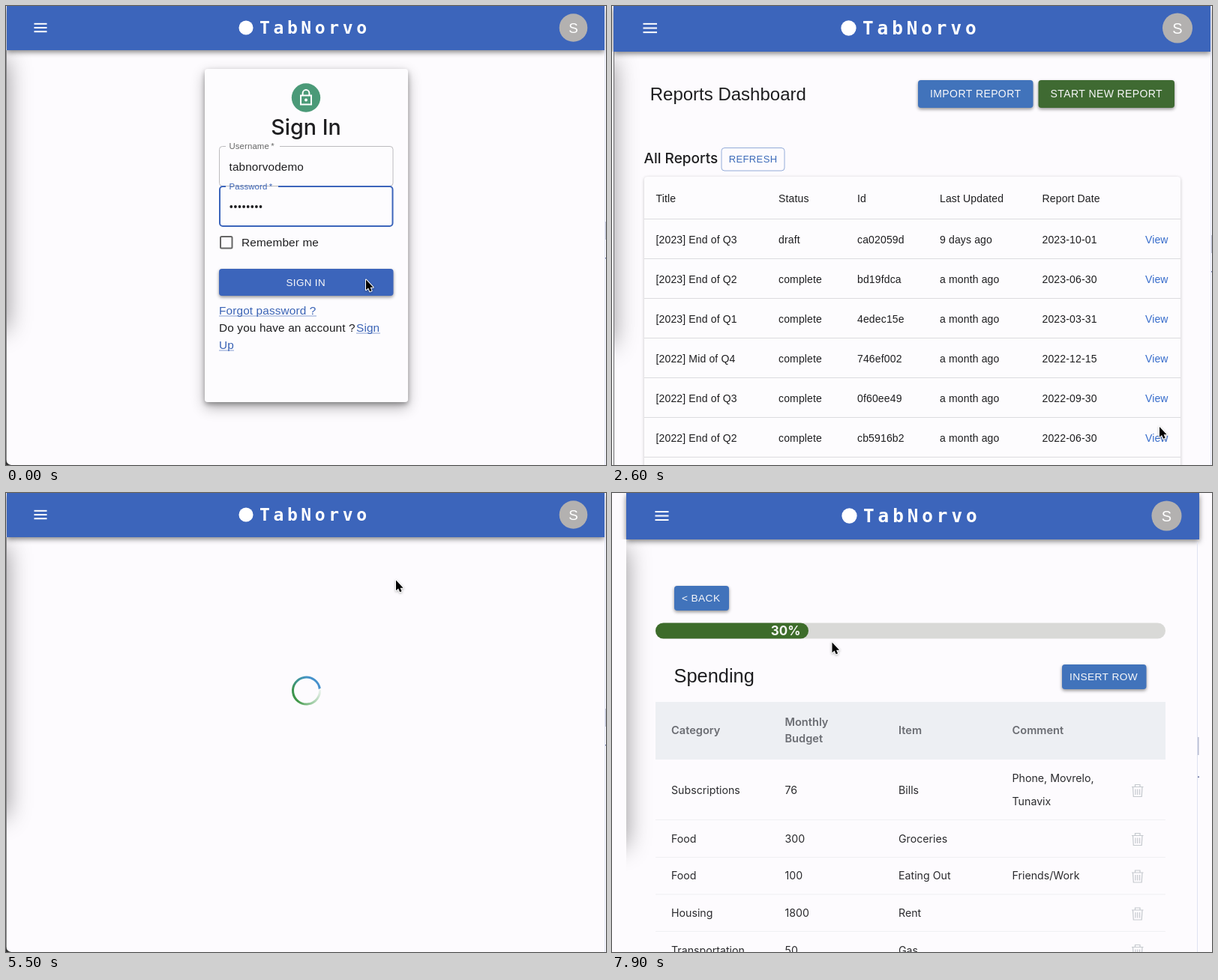
These frames come from a looping animation (800 by 613 pixels, 8000 ms). An HTML page with a canvas:

```html
<!DOCTYPE html>
<html lang="en">
<head>
<meta charset="utf-8">
<title>Budget reports</title>
<style>
html, body { margin: 0; width: 100%; height: 100%; overflow: hidden; background: #fdfbfe; }
canvas { display: block; width: 100vw; height: 100vh; }
</style>
</head>
<body>
<canvas id="stage" width="800" height="613"></canvas>
<script>
const ctx = document.getElementById('stage').getContext('2d');
const LOOP = 8000, STEP = 100, W = 800, H = 613;
const SANS = '"Liberation Sans", Arial, sans-serif';
const UI = 'Inter, sans-serif';
const MONO = '"DejaVu Sans Mono", monospace';
const BG = '#fdfbfe', INK = '#1e1e20', BAR = '#3c65bb', LINK = '#3a63b5';
const BLUE = '#4173bb', GREEN = '#3f6a32', ORANGE = '#c66a31', RED = '#a43a31';

// ---------- helpers ----------
function text(s, x, y, size, color = INK, o = {}) {
  ctx.font = `${o.weight || 400} ${size}px ${o.font || SANS}`;
  ctx.letterSpacing = (o.gap || 0) + 'px';
  ctx.textAlign = o.align || 'left';
  ctx.fillStyle = color;
  ctx.fillText(s, x, y);
}

function box(x, y, w, h, color) {
  ctx.fillStyle = color;
  ctx.fillRect(x, y, w, h);
}

function round(x, y, w, h, r) {
  ctx.beginPath();
  ctx.roundRect(x, y, w, h, r);
}

function disc(x, y, r, color) {
  ctx.beginPath();
  ctx.arc(x, y, r, 0, Math.PI * 2);
  ctx.fillStyle = color;
  ctx.fill();
}

function shadowed(alpha, blur, dy, draw) {
  ctx.save();
  ctx.shadowColor = `rgba(0,0,0,${alpha})`;
  ctx.shadowBlur = blur;
  ctx.shadowOffsetY = dy;
  draw();
  ctx.restore();
}

function card(x, y, w, h, alpha, blur, dy) {
  shadowed(alpha, blur, dy, () => {
    round(x, y, w, h, 4);
    ctx.fillStyle = '#fdfcfe';
    ctx.fill();
  });
}

function button(label, x, y, w, h, color, tx, size = 13) {
  shadowed(0.42, 4, 2, () => {
    round(x, y, w, h, 4);
    ctx.fillStyle = color;
    ctx.fill();
  });
  text(label, tx, y + h / 2 + size * 0.34, size, '#f8f8fa', { gap: size * 0.0286 });
}

function outlined(label, x, y, w, h) {
  round(x, y, w, h, 4);
  ctx.lineWidth = 1;
  ctx.strokeStyle = '#94acd9';
  ctx.stroke();
  text(label, x + 9.7, y + h / 2 + 4.4, 13, '#3d6bb9', { gap: 0.38 });
}

function link(s, x, y, w) {
  text(s, x, y, 15.35, LINK, { gap: 0.144 });
  box(x, y + 2, w, 1, 'rgba(58,99,181,.6)');
}

// ---------- window frame ----------
const small = { x: 1, r: 798, h: 59, menu: 37.5, mw: 17, logo: 320, title: 338, size: 23,
  av: 756.5, ar: 18.8, cy: 29, fade: 432 };
const large = { x: 2, r: 798, h: 61, menu: 41.5, mw: 18.5, logo: 315.5, title: 334, size: 24.4,
  av: 754, ar: 20, cy: 29.5, fade: 452 };
const inset = { x: 19, r: 783, h: 62, menu: 57.5, mw: 18, logo: 316.5, title: 335, size: 24.4,
  av: 739.5, ar: 20, cy: 30.5, fade: 472 };

function frame(f) {
  box(0, 0, W, H, BG);
  ctx.save();
  ctx.beginPath();
  ctx.rect(f.x, f.h, W, H);
  ctx.clip();
  shadowed(0.42, 32, 0, () => box(f.x - 60, f.h + 12, 60, f.fade - f.h - 12, '#000'));
  ctx.restore();
  shadowed(0.5, 7, 2.5, () => box(f.x, 0, f.r - f.x, f.h, BAR));
  box(0, f.h, f.x, H, BG);
  for (const d of [-5.5, 0, 5.5]) box(f.menu, f.cy + d * f.mw / 18 - 1, f.mw, 2, '#fff');
  disc(f.logo, f.cy, f.size * 0.415, '#fff');
  text('TabNorvo', f.title, f.cy + f.size * 0.345, f.size, '#fff',
    { font: MONO, weight: 700, gap: f.size * 0.2 });
  disc(f.av, f.cy, f.ar, '#b3b1b0');
  text('S', f.av, f.cy + f.ar * 0.35, f.ar, '#fff', { align: 'center' });
}

// Slivers of the neighbouring window on the right
function rightEdge(x, y) {
  box(x, 0, 1, H, '#dfe4f5');
  box(x + 1, y, 1.5, 24, '#c3c5d2');
  box(x + 1, y + 48, 2, 1.5, '#6670a0');
}

function smallFrame() {
  frame(small);
  box(0, small.h, 1, H, '#8c8c8e');
  rightEdge(798, 288);
  ctx.beginPath();
  ctx.moveTo(0, 606);
  ctx.quadraticCurveTo(1, 612, 7, 613);
  ctx.lineTo(0, 613);
  ctx.fillStyle = '#333';
  ctx.fill();
}

// ---------- pages ----------
function signIn() {
  smallFrame();
  card(265, 84, 271, 445, 0.3, 18, 7);
  card(265, 84, 271, 445, 0.3, 6, 3);

  disc(400, 122.5, 19.2, '#4b9a78');
  ctx.strokeStyle = '#fff';
  ctx.lineWidth = 2;
  ctx.strokeRect(393, 119.5, 14, 12);
  ctx.beginPath();
  ctx.moveTo(395.6, 119);
  ctx.lineTo(395.6, 116.5);
  ctx.arc(400, 116.5, 4.4, Math.PI, 0);
  ctx.lineTo(404.4, 119);
  ctx.stroke();
  disc(400, 125.5, 2, '#fff');
  text('Sign In', 400, 172, 28.7, INK, { font: UI, weight: 500, align: 'center' });

  round(284.5, 187.5, 231.5, 53, 4);
  ctx.lineWidth = 1;
  ctx.strokeStyle = '#bcbbbe';
  ctx.stroke();
  box(293, 186, 72, 3, '#fdfcfe');
  text('Username\u2009*', 297.5, 191, 11.4, '#666', { gap: 0.1 });
  text('tabnorvodemo', 297.5, 219.5, 15.3, INK, { gap: 0.144 });

  ctx.save();
  ctx.beginPath();
  ctx.rect(280, 236, 13, 10);
  ctx.rect(363, 236, 160, 10);
  ctx.rect(280, 246, 243, 55);
  ctx.clip();
  round(285, 241, 230.5, 53, 4);
  ctx.lineWidth = 2;
  ctx.strokeStyle = BAR;
  ctx.stroke();
  ctx.restore();
  text('Password\u2009*', 297.5, 245, 11.4, LINK, { gap: 0.1 });
  for (let i = 0; i < 8; i++) disc(300.3 + i * 5.6, 268, 1.9, INK);

  round(286, 308, 15.5, 15.5, 1.5);
  ctx.lineWidth = 2;
  ctx.strokeStyle = '#666';
  ctx.stroke();
  text('Remember me', 314, 321, 15.35, INK, { gap: 0.144 });
  button('SIGN IN', 284, 351, 232.5, 36, BAR, 373.5, 13.4);
  link('Forgot password ?', 284, 411.5, 130);
  text('Do you have an account ?', 284, 434.5, 15.35, INK, { gap: 0.144 });
  link('Sign', 467, 434.5, 32);
  link('Up', 284, 457.5, 20);
}

function loading(t) {
  smallFrame();
  const start = -0.14 + (t - 5500) / 1400 * Math.PI * 2;
  const g = ctx.createConicGradient(start, 400.5, 264);
  g.addColorStop(0, 'rgba(70,160,80,.05)');
  g.addColorStop(0.22, 'rgba(70,160,80,.55)');
  g.addColorStop(0.38, '#3f9646');
  g.addColorStop(0.55, '#3d9453');
  g.addColorStop(0.7, '#4196a8');
  g.addColorStop(0.8, '#4592cb');
  g.addColorStop(1, '#4790cd');
  ctx.beginPath();
  ctx.arc(400.5, 264, 18, start, start + Math.PI * 2);
  ctx.lineWidth = 3;
  ctx.strokeStyle = g;
  ctx.stroke();
}

const reports = [
  ['[2023] End of Q3', 'draft', 'ca02059d', '9 days ago', '2023-10-01'],
  ['[2023] End of Q2', 'complete', 'bd19fdca', 'a month ago', '2023-06-30'],
  ['[2023] End of Q1', 'complete', '4edec15e', 'a month ago', '2023-03-31'],
  ['[2022] Mid of Q4', 'complete', '746ef002', 'a month ago', '2022-12-15'],
  ['[2022] End of Q3', 'complete', '0f60ee49', 'a month ago', '2022-09-30'],
  ['[2022] End of Q2', 'complete', 'cb5916b2', 'a month ago', '2022-06-30']
];

function dashboard() {
  frame(large);
  box(2, large.h, 1, H, '#6a6a6c');
  rightEdge(798, 306);
  text('Reports Dashboard', 50.7, 125.5, 24);
  button('IMPORT REPORT', 408, 99, 153.5, 37, BLUE, 424, 14);
  button('START NEW REPORT', 568.5, 99, 181.5, 37, GREEN, 584.5, 14);
  text('All Reports', 42.5, 210, 19, INK, { font: UI, weight: 500 });
  outlined('REFRESH', 146, 189.5, 84, 30.5);
  card(43, 228, 715, 420, 0.22, 4, 1);
  const cols = [58.5, 222, 327, 437, 573.5];
  const row = (cells, y) => cells.forEach((s, i) => text(s, cols[i], y, 14, INK, { gap: 0.15 }));
  row(['Title', 'Status', 'Id', 'Last Updated', 'Report Date'], 261.5);
  box(43, 284, 715, 1, '#dcdcdf');
  reports.forEach((r, i) => {
    row(r, 316.5 + i * 53);
    text('View', 711, 316.5 + i * 53, 14, '#366ccb', { gap: 0.1 });
    box(43, 337 + i * 53, 715, 1, '#dcdcdf');
  });
}

function section(title, y, editX, cols, heads, cells) {
  text(title, 66.5, y + 39.5, 24);
  button('EDIT', editX, y + 18, 63.5, 31, ORANGE, editX + 16);
  box(43, y + 64, 716, 50.5, '#edeff3');
  heads.forEach((s, i) => text(s, cols[i], y + 94, 13.8, '#6b6d73', { font: UI, weight: 600 }));
  cells.forEach((s, i) => text(s, cols[i], y + 143.5, 13.5, '#2b2b2e', { font: UI }));
  box(43, y + 162, 716, 1, '#f1f1f4');
}

function report() {
  frame(inset);
  text('[2022] End of Q2', 64.5, 118, 34, INK, { gap: 0.2 });
  outlined('RENAME', 343.5, 97, 77, 30);
  button('EDIT', 504.5, 97, 63.5, 31, ORANGE, 520.5);
  button('EXPORT', 574.5, 97, 75.5, 31, GREEN, 584.5);
  button('DELETE', 656, 97, 73, 31, RED, 666);
  outlined('REFRESH', 66.5, 152, 84, 29.5);
  text('Updated: a month ago', 157, 169, 16, INK, { gap: 0.12 });
  card(43, 206, 716.5, 440, 0.22, 4, 1);
  section('Income', 206, 154, [62.5, 241.5, 421, 600],
    ['Name', 'Monthly Gross', 'Monthly Net', 'Comment'], ['Office Job', '$5000.00', '$3,617.50']);
  section('Taxes', 369, 138, [62.5, 301.5, 540.5],
    ['Category', 'Monthly Tax', 'Comment'], ['Army Tax', '$1382.00']);
  section('Spending', 532.5, 176.5, [], [], []);
}

function trash(y) {
  ctx.strokeStyle = '#c5c9ce';
  ctx.lineWidth = 1.2;
  ctx.beginPath();
  ctx.moveTo(693, y - 5);
  ctx.lineTo(708.5, y - 5);
  ctx.moveTo(697.5, y - 5);
  ctx.lineTo(697.5, y - 8);
  ctx.lineTo(704, y - 8);
  ctx.lineTo(704, y - 5);
  ctx.moveTo(694.5, y - 5);
  ctx.lineTo(695.3, y + 8);
  ctx.lineTo(706.2, y + 8);
  ctx.lineTo(707, y - 5);
  for (const x of [698, 700.8, 703.6]) {
    ctx.moveTo(x, y - 2);
    ctx.lineTo(x, y + 5.5);
  }
  ctx.stroke();
}

const spends = [
  ['Subscriptions', '76', 'Bills', '', 401.5],
  ['Food', '300', 'Groceries', '', 466.5],
  ['Food', '100', 'Eating Out', 'Friends/Work', 516],
  ['Housing', '1800', 'Rent', '', 566],
  ['Transportation', '50', 'Gas', '', 615.5]
];

function spending() {
  frame(inset);
  box(780, 66, 1, H, '#dfe3f2');
  box(781, 326, 1.5, 24, '#b9bdd2');
  box(781, 378.5, 2, 1.5, '#6670a0');
  button('< BACK', 83, 124, 73, 33, BLUE, 93, 13.7);
  round(58, 173.5, 680, 21, 10.5);
  ctx.fillStyle = '#d9d9d7';
  ctx.fill();
  round(58, 173.5, 204, 21, 10.5);
  ctx.fillStyle = '#3d6c2a';
  ctx.fill();
  text('30%', 251.5, 190, 17, '#f6f6f4', { font: UI, weight: 700, align: 'right' });
  text('Spending', 82.5, 253, 25.4);
  button('INSERT ROW', 600, 229, 112.5, 33, BLUE, 610, 13.7);

  box(58, 279, 680, 77, '#edeff3');
  const cols = [79, 230.5, 382, 533.5];
  const head = (s, i, y) => text(s, cols[i], y, 14.6, '#6b6d73', { font: UI, weight: 600 });
  head('Category', 0, 322);
  head('Monthly', 1, 311);
  head('Budget', 1, 333);
  head('Item', 2, 322);
  head('Comment', 3, 322);
  const cell = (s, i, y) => text(s, cols[i], y, 14.2, '#2b2b2e', { font: UI });
  for (const r of spends) {
    const y = r[4];
    for (let i = 0; i < 4; i++) cell(r[i], i, y);
    trash(y - 4);
  }
  cell('Phone, Movrelo,', 3, 386);
  cell('Tunavix', 3, 417);
  for (const y of [436, 486, 535.5, 585]) box(58, y, 680, 1, '#f0f0f3');
}

// ---------- timing ----------
const scenes = [
  [0, signIn], [300, loading], [700, dashboard], [2900, loading],
  [3300, report], [5500, loading], [5900, spending]
];

// time, x, y of the pointer tip
const path = [
  [0, 480, 365.5], [500, 480, 365.5], [1200, 311, 325], [1500, 311, 325], [2500, 730, 562],
  [3300, 730, 562], [4300, 445, 217], [4500, 445, 217], [5200, 520, 116.5],
  [6500, 520, 116.5], [7700, 293.5, 199.5], [8000, 293.5, 199.5]
];

function pointer(t) {
  const i = path.findIndex(p => p[0] > t);
  const [t0, x0, y0] = path[i - 1], [t1, x1, y1] = path[i];
  const k = (t - t0) / (t1 - t0), e = k * k * (3 - 2 * k);
  const shape = [0, 0, 0, 13.8, 3.1, 11, 5.2, 15.8, 7.6, 14.8, 5.6, 10.2, 9.6, 10.2];
  ctx.save();
  ctx.translate(x0 + (x1 - x0) * e, y0 + (y1 - y0) * e);
  ctx.beginPath();
  for (let j = 0; j < shape.length; j += 2) ctx.lineTo(shape[j], shape[j + 1]);
  ctx.closePath();
  ctx.lineJoin = 'round';
  ctx.lineWidth = 2;
  ctx.strokeStyle = '#fff';
  shadowed(0.3, 3, 1, () => ctx.stroke());
  ctx.fillStyle = '#000';
  ctx.fill();
  ctx.restore();
}

function draw(now) {
  const t = Math.floor(now % LOOP / STEP) * STEP;
  const scene = scenes.filter(s => s[0] <= t).pop()[1];
  scene(t);
  pointer(t);
}

const begin = performance.now();
function tick() {
  draw(performance.now() - begin);
  requestAnimationFrame(tick);
}
tick();
</script>
</body>
</html>
```
